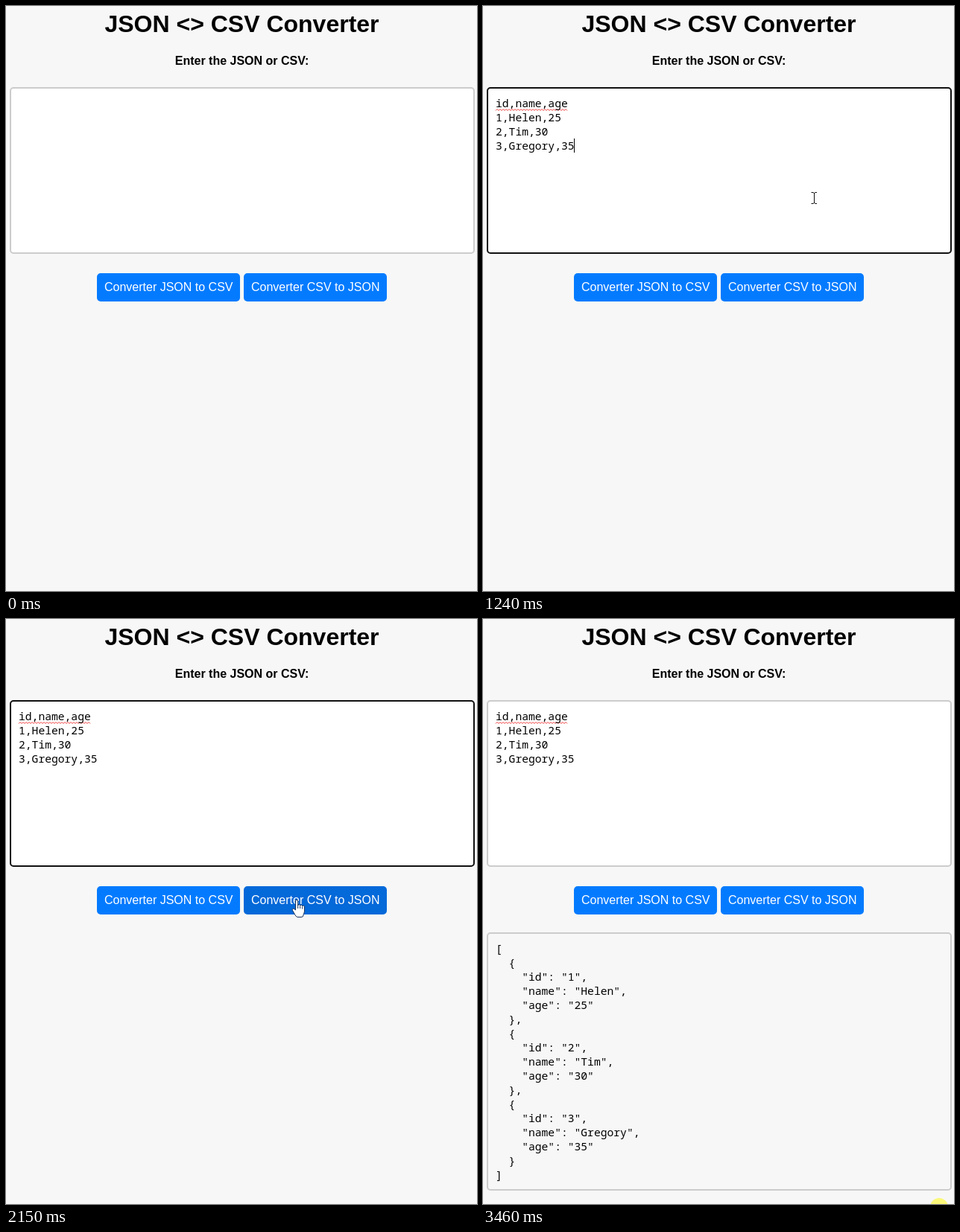
Write an HTML page that moves like this. It is 632x786 px and loops after 3530 ms.

```html
<!DOCTYPE html>
<html lang="en">
<head>
<meta charset="utf-8">
<title>JSON &lt;&gt; CSV Converter</title>
<style>
  html, body { margin: 0; width: 100%; height: 100%; overflow: hidden; background: #f7f7f7; }
  svg { display: block; width: 632px; height: 786px; }
  text { font-family: "Liberation Sans", Arial, sans-serif; font-size: 16px; }
  .heading { font-weight: bold; text-anchor: middle; }
  .code text { font-family: "Noto Sans Mono", monospace; font-size: 14.66px; white-space: pre; }
  .box { stroke: #ccc; stroke-width: 2; }
  .pointer { fill: #fff; stroke: #14305a; stroke-linejoin: round; }
</style>
</head>
<body>
<svg viewBox="0 0 632 786">
  <text class="heading" x="316.5" y="35" style="font-size:32px">JSON &lt;&gt; CSV Converter</text>
  <text class="heading" x="316.5" y="79">Enter the JSON or CSV:</text>

  <rect id="input" class="box" x="6" y="110" width="622" height="222" rx="4" fill="#fff"/>
  <g id="csv" class="code"><path id="squiggle" fill="none" stroke="#f03a3a"/></g>
  <rect id="caret" width="1" height="19"/>

  <rect id="toCsv" x="122" y="359" width="192" height="38" rx="5"/>
  <text x="132" y="383" fill="#fff">Converter JSON to CSV</text>
  <rect id="toJson" x="319" y="359" width="192" height="38" rx="5"/>
  <text x="329" y="383" fill="#fff">Converter CSV to JSON</text>

  <g id="output" class="code">
    <rect class="box" x="6" y="422" width="622" height="345" rx="4" fill="#f7f7f7"/>
  </g>

  <circle id="halo" cx="612" cy="790" r="12" fill="#fbf87a"/>
  <g id="cursor">
    <path id="arrow" class="pointer" d="M.5 .5V16.5L4.2 13L6.6 18.7L9.2 17.6L6.8 12H11.6Z"/>
    <path id="beam" fill="none" stroke="#111" d="M-3.5 -7.5H-1L.5 -6.5L2 -7.5H4M.5 -7V7M-3.5 7.5H-1L.5 6.5L2 7.5H4"/>
    <g id="hand" class="pointer">
      <path d="M-1.5 13V1a1.6 1.6 0 0 1 3.2 0V7a1.5 1.5 0 0 1 3 .3a1.5 1.5 0 0 1 3 .8a1.4 1.4 0 0 1 2.8 .9V14c0 3-1.5 4-1.5 6q0 2.5-3 2.5H2c-3 0-3.5-2-5-4.5L-5.5 13.5c-1-2 1-3.2 2.3-1.9Z"/>
      <path fill="none" d="M1.7 7V11M4.7 7.5V11M7.7 8.5V11.5"/>
    </g>
  </g>
</svg>
<script>
const LOOP = 3530, LINE = 19;
const $ = id => document.getElementById(id);

const people = [["1", "Helen", "25"], ["2", "Tim", "30"], ["3", "Gregory", "35"]];
const fields = ["id", "name", "age"];
const csvLines = [fields, ...people].map(row => row.join(","));
const records = people.map(row => Object.fromEntries(fields.map((key, i) => [key, row[i]])));

function addLines(parent, lines, baseline) {
  lines.forEach((line, i) => {
    const text = document.createElementNS("http://www.w3.org/2000/svg", "text");
    text.setAttribute("x", 17);
    text.setAttribute("y", baseline + i * LINE);
    text.textContent = line;
    parent.append(text);
  });
}
addLines($("csv"), csvLines, 136);
addLines($("output"), JSON.stringify(records, null, 2).split("\n"), 448);
$("squiggle").setAttribute("d", "M17 140.5" + "l2 -2l2 2".repeat(24));

// Every track is a list of [start in ms, ...values]; values hold until the next entry.
const cursorTrack = [
  [0],
  [350, "arrow", 606, 772], [420, "arrow", 597, 645], [490, "arrow", 583, 492],
  [560, "arrow", 530, 368], [630, "beam", 486, 256], [700, "beam", 467, 221],
  [830, "beam", 468, 220], [1240, "beam", 444, 258], [1310, "beam", 406, 302],
  [1380, "arrow", 370, 340], [1450, "hand", 330, 360], [1520, "hand", 275, 384],
  [1590, "hand", 195, 394], [1730, "hand", 206, 392], [1800, "hand", 250, 388],
  [1870, "hand", 310, 383], [1940, "hand", 365, 379], [2010, "hand", 390, 378],
  [2630, "arrow", 418, 470], [2700, "arrow", 455, 560], [2770, "arrow", 484, 633],
  [2840, "arrow", 505, 685], [2910, "arrow", 520, 728], [2980, "arrow", 534, 770],
  [3050]
];
const caretTrack = [[0], [700, 17, 121], [960, 122, 178], [1870]];
const toCsvHover = [[0, 0], [1590, .1], [1660, .5], [1730, .9], [1800, 1], [1870, .8], [1940, .4], [2010, 0]];
const toJsonHover = [[0, 0], [1940, .3], [2010, .6], [2080, 1], [2700, .85], [2770, .65], [2840, .4], [2910, .2], [2980, 0]];

const at = (track, t) => track.findLast(step => step[0] <= t).slice(1);
const show = (id, on) => { $(id).style.display = on ? "" : "none"; };
const buttonColor = hover => `rgb(${[4, 123 - 18 * hover, 255 - 38 * hover].map(Math.round)})`;

function render(t) {
  const [kind, x = 0, y = 0] = at(cursorTrack, t);
  for (const id of ["arrow", "beam", "hand"]) show(id, id === kind);
  $("cursor").setAttribute("transform", `translate(${x} ${y})`);

  const [caretX, caretY] = at(caretTrack, t);
  show("caret", caretX !== undefined);
  if (caretX !== undefined) {
    $("caret").setAttribute("x", caretX);
    $("caret").setAttribute("y", caretY);
  }

  $("input").style.stroke = t >= 700 && t < 2220 ? "#101010" : "#ccc";
  $("toCsv").style.fill = buttonColor(at(toCsvHover, t)[0]);
  $("toJson").style.fill = buttonColor(at(toJsonHover, t)[0]);
  show("csv", t >= 960);
  show("squiggle", t >= 1030);
  show("output", t >= 2290);
  show("halo", t >= 3460);
}

const start = performance.now();
function tick() {
  render((performance.now() - start) % LOOP);
  requestAnimationFrame(tick);
}
tick();
</script>
</body>
</html>
```
